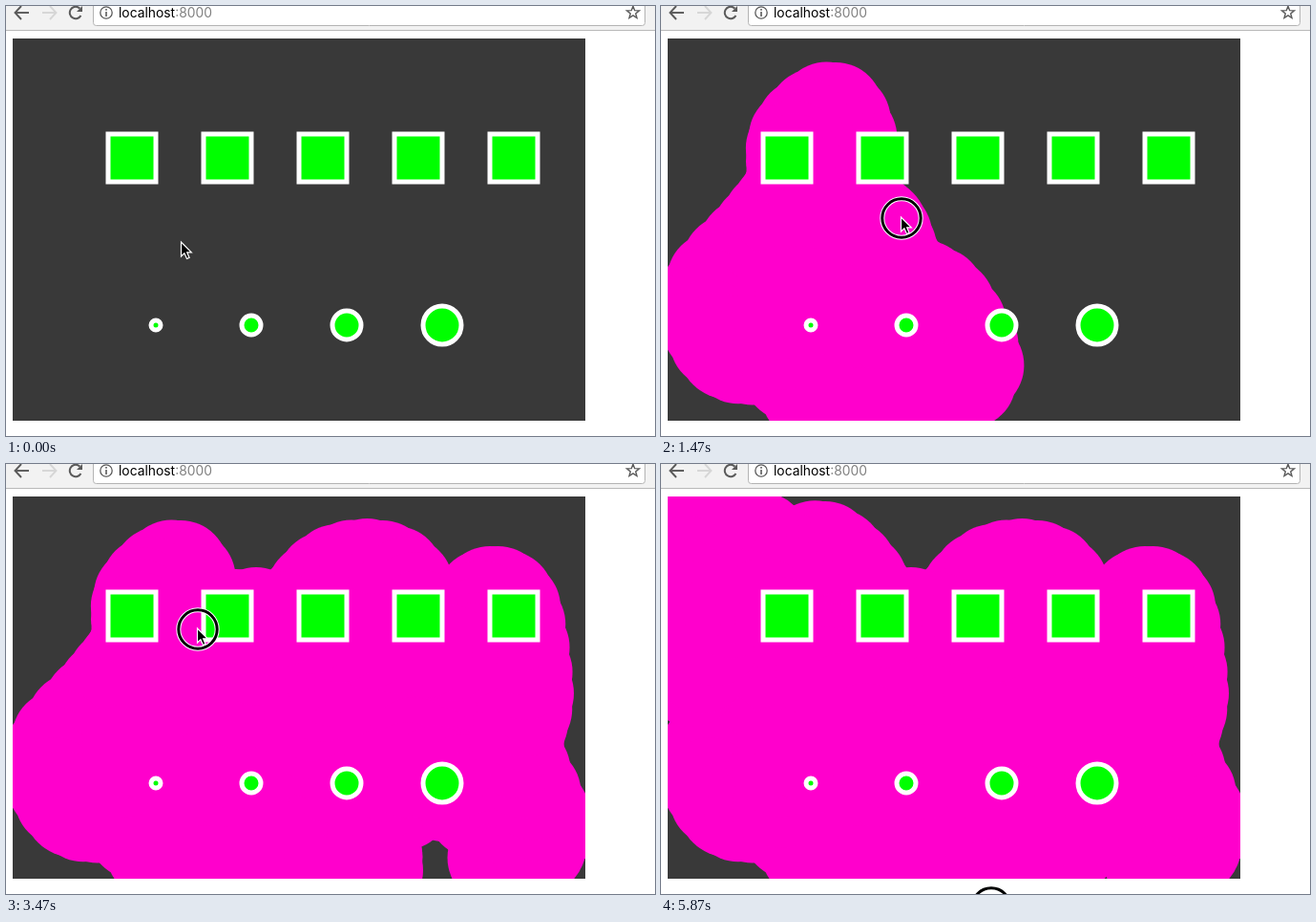
An HTML page with a canvas that plays this animation: 680x450 px, repeating every 5940 ms.

```html
<!DOCTYPE html>
<html lang="en">
<head>
<meta charset="utf-8">
<title>Paint</title>
<style>
html, body { margin: 0; width: 100%; height: 100%; overflow: hidden; background: #fff; }
canvas { display: block; }
</style>
</head>
<body>
<canvas id="stage" width="680" height="450"></canvas>
<script>
const ctx = document.getElementById('stage').getContext('2d');
const LOOP = 5940, TICK = 1000 / 15, TAU = Math.PI * 2;
const BRUSH = 50, DABS = 4, LAG = 0.8;
const PRESS = 2, END = 88;
const GREY = '#5a5a5a';

// The mouse follows a smooth curve through a few turning points per leg.
const legs = [
  { tick: PRESS, via: [[184, 248], [204, 178], [183, 109], [142, 137], [137, 190]] },
  { tick: 9, via: [[104, 236], [47, 303], [69, 361], [125, 365], [165, 350], [206, 238]] },
  { tick: 14, via: [[229, 231], [252, 280], [300, 314], [322, 392], [155, 406], [130, 300], [230, 330]] },
  { tick: 22, via: [[252, 222], [301, 160], [347, 113], [408, 115], [440, 180], [447, 270],
    [445, 330], [380, 361], [318, 280], [355, 218], [400, 270]] },
  { tick: 33, via: [[505, 366], [400, 325], [387, 425], [400, 325], [500, 345], [517, 425], [565, 385],
    [535, 300], [545, 240], [531, 150], [500, 140], [485, 195], [380, 185], [262, 158]] },
  { tick: 52, via: [[201, 173], [215, 135], [172, 89], [130, 98], [95, 74], [40, 68],
    [22, 150], [32, 225], [90, 140], [170, 220]] },
  { tick: 67, via: [[274, 322], [480, 270], [430, 398], [360, 360]] },
  { tick: END, via: [[346, 464]] }
];

const keys = legs.flatMap(({ tick, via }, n) => {
  const next = n + 1 < legs.length ? legs[n + 1].tick : tick + 1;
  return via.map(([x, y], i) => ({ x, y, at: tick + (next - tick) * i / via.length }));
});
const last = keys.length - 1;

// Catmull-Rom point at fraction f of segment i
function curve(i, f) {
  const [a, b, c, d] = [-1, 0, 1, 2].map(o => keys[Math.min(last, Math.max(0, i + o))]);
  const mix = k => b[k] + f / 2 * (c[k] - a[k] +
    f * (2 * a[k] - 5 * b[k] + 4 * c[k] - d[k] + f * (3 * (b[k] - c[k]) + d[k] - a[k])));
  return { x: mix('x'), y: mix('y'), at: b.at + (c.at - b.at) * f };
}

const dabs = [];
for (let i = 0; i < last; i++) {
  for (let s = 0; s < DABS; s++) dabs.push(curve(i, s / DABS));
}

function mouseAt(tick) {
  const i = keys.findIndex(k => k.at > tick) - 1;
  if (tick >= END) return keys[last];
  if (i < 0) return keys[0];
  return curve(i, (tick - keys[i].at) / (keys[i + 1].at - keys[i].at));
}

function disc(x, y, r, color) {
  ctx.fillStyle = color;
  ctx.beginPath();
  ctx.arc(x, y, r, 0, TAU);
  ctx.fill();
}

function ring(x, y, r, width, color, from = 0, to = TAU) {
  ctx.strokeStyle = color;
  ctx.lineWidth = width;
  ctx.beginPath();
  ctx.arc(x, y, r, from, to);
  ctx.stroke();
}

function line(color, width, ...pts) {
  ctx.strokeStyle = color;
  ctx.lineWidth = width;
  ctx.beginPath();
  for (const [x, y] of pts) ctx.lineTo(x, y);
  ctx.stroke();
}

function navArrow(x, dir, color) {
  line(color, 1.9, [x - 7 * dir, 7], [x + 7 * dir, 7]);
  line(color, 1.9, [x + dir, 0], [x + 7.5 * dir, 7], [x + dir, 14]);
}

function star(x, y) {
  ctx.strokeStyle = GREY;
  ctx.lineWidth = 1.4;
  ctx.beginPath();
  for (let i = 0; i < 10; i++) {
    const r = i % 2 ? 2.9 : 6.8, a = i * TAU / 10 - TAU / 4;
    ctx.lineTo(x + r * Math.cos(a), y + r * Math.sin(a));
  }
  ctx.closePath();
  ctx.stroke();
}

function toolbar() {
  ctx.fillStyle = '#f2f2f2';
  ctx.fillRect(0, 0, 680, 25);
  ctx.fillStyle = '#b9b9b9';
  ctx.fillRect(0, 25, 680, 1);

  ctx.fillStyle = '#fff';
  ctx.strokeStyle = '#b4b4b4';
  ctx.lineWidth = 1;
  ctx.beginPath();
  ctx.roundRect(91.5, -10.5, 578, 31, 3);
  ctx.fill();
  ctx.stroke();

  navArrow(17, -1, GREY);
  navArrow(45, 1, '#d6d6d6');
  ring(73, 7, 6.2, 2, GREY, 0.5, 5.5);
  ctx.fillStyle = GREY;
  ctx.beginPath();
  ctx.moveTo(80, 0);
  ctx.lineTo(80, 6);
  ctx.lineTo(74, 6);
  ctx.fill();

  ring(105, 7, 6.2, 1.3, GREY);
  ctx.fillRect(104.2, 6, 1.6, 5);
  ctx.fillRect(104.2, 3, 1.6, 1.7);

  ctx.font = '13.85px Inter, "Open Sans", sans-serif';
  ctx.fillStyle = '#000';
  ctx.fillText('localhost', 118, 12);
  const w = ctx.measureText('localhost').width;
  ctx.fillStyle = '#808080';
  ctx.fillText(':8000', 118 + w, 12);
  star(657, 7);
}

function board(tick) {
  ctx.save();
  ctx.beginPath();
  ctx.rect(7, 34, 600, 400);
  ctx.clip();
  ctx.fillStyle = '#393939';
  ctx.fillRect(7, 34, 600, 400);
  for (const d of dabs) {
    if (d.at < tick - LAG) disc(d.x, d.y, BRUSH, '#ff00cc');
  }
  for (let i = 0; i < 5; i++) {
    const x = 107 + 100 * i;
    ctx.fillStyle = '#0f0';
    ctx.fillRect(x, 134, 50, 50);
    ctx.strokeStyle = '#fff';
    ctx.lineWidth = 5;
    ctx.strokeRect(x, 134, 50, 50);
  }
  for (let i = 0; i < 4; i++) {
    const x = 157 + 100 * i, r = 5 + 5 * i;
    disc(x, 334, r, '#0f0');
    ring(x, 334, r, 5, '#fff');
  }
  ctx.restore();
}

function pointer(x, y) {
  ctx.beginPath();
  for (const [dx, dy] of [[0, 0], [0, 15], [3.4, 11.8], [6, 17.5], [8.6, 16.4], [6.2, 10.8], [10.8, 10.8]]) {
    ctx.lineTo(x + dx, y + dy);
  }
  ctx.closePath();
  ctx.fillStyle = '#000';
  ctx.fill();
  ctx.strokeStyle = '#fff';
  ctx.lineWidth = 1.2;
  ctx.stroke();
}

function draw(time) {
  const tick = Math.floor((time % LOOP + 4) / TICK);
  const m = mouseAt(tick);
  ctx.fillStyle = '#fff';
  ctx.fillRect(0, 0, 680, 450);
  toolbar();
  board(tick);
  if (tick >= PRESS) {
    ring(m.x, m.y, 20.2, 5, '#fff');
    ring(m.x, m.y, 20.2, 3, '#000');
  }
  pointer(m.x - 0.5, m.y - 1);
}

const start = performance.now();
function loop() {
  draw(performance.now() - start);
  requestAnimationFrame(loop);
}
loop();
</script>
</body>
</html>
```
